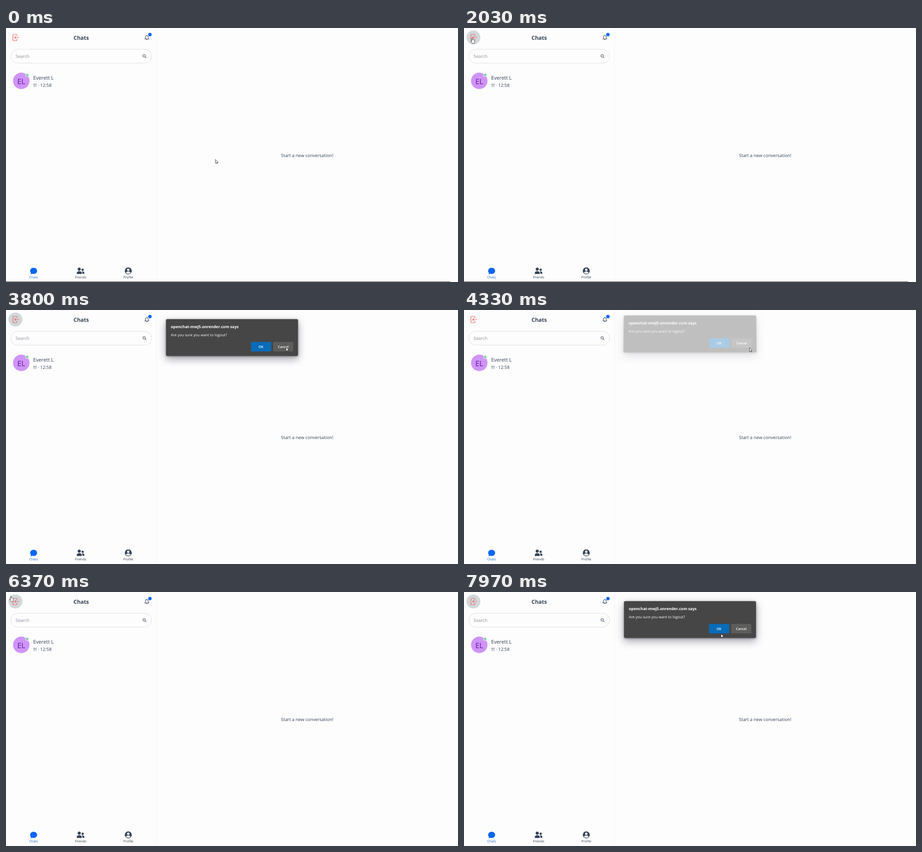
An HTML page for the animation above (8000 ms loop, 998x561 px).

```html
<!DOCTYPE html>
<html lang="en">
<head>
<meta charset="utf-8">
<title>Chats</title>
<style>
  html, body { margin: 0; width: 100%; height: 100%; overflow: hidden; background: #fdfdfd; }
  svg { position: absolute; left: 0; top: 0; font-family: "Open Sans", "Noto Sans", sans-serif; font-size: 9.8px; text-rendering: geometricPrecision; }
  .mid { text-anchor: middle; }
  .nav { font-size: 7.3px; text-anchor: middle; }
  .line { fill: none; stroke-linecap: round; stroke-linejoin: round; }
  #dialog { left: 353px; top: 19.5px; border-radius: 4px; background: #464646; box-shadow: 0 7px 18px rgba(20, 20, 50, .36), 0 1px 5px rgba(0, 0, 0, .3); fill: #fff; }
  #dialog .button { font-size: 7.4px; font-weight: 600; text-anchor: middle; }
</style>
</head>
<body>
<svg width="998" height="561" fill="#334155">
  <rect x="332" width="1" height="561" fill="#f1f1fa"/>

  <circle id="exitHover" cx="20.8" cy="20.8" r="15.4" fill="#d2d8da"/>
  <g class="line" stroke="#ea6262" stroke-width="1.2">
    <path d="M24.3 17.5V16a2 2 0 0 0-2-2h-5a2 2 0 0 0-2 2v10a2 2 0 0 0 2 2h5a2 2 0 0 0 2-2v-1.5M28.5 21H19M21.6 18.3 18.9 21l2.7 2.7"/>
  </g>
  <text class="mid" x="166" y="26" font-size="12" font-weight="700">Chats</text>
  <path class="line" stroke="#334155" stroke-width="1.1" d="M306.7 24.3c1.2-1.1 1.2-2.4 1.3-4.2a3 3.4 0 0 1 6 0c.1 1.8.1 3.1 1.3 4.2zM309.8 24.6a1.3 1.5 0 0 0 2.4 0M311 15.8v.8"/>
  <circle cx="317.8" cy="14.6" r="3.8" fill="#0866f5"/>

  <rect x="10.5" y="47" width="311" height="30.5" rx="15.25" fill="none" stroke="#dedfe2"/>
  <text x="21" y="66.4" fill="#8b929c">Search</text>
  <g class="line" stroke="#596273" stroke-width="1.1">
    <circle cx="305" cy="61.6" r="2.7"/><path d="M307.1 63.7l2.3 2.3"/>
  </g>

  <rect id="itemHover" x="5" y="89" width="322" height="56" rx="5" fill="#f0f0f1"/>
  <circle cx="33.7" cy="116.8" r="18.2" fill="#d094f8"/>
  <text class="mid" x="33.7" y="123.6" font-size="16.2" fill="#5c16a0">EL</text>
  <circle cx="46.6" cy="103.9" r="3.6" fill="#83cfb0" stroke="#fdfdfd"/>
  <text x="60" y="113.6" font-size="11.2" font-weight="500">Everett L</text>
  <text x="60" y="130.4">!!! · 12:58</text>

  <text class="mid" x="665" y="284.7">Start a new conversation!</text>

  <path fill="#0866f5" d="M61 529.6c4.3 0 7.7 3 7.7 6.8s-3.4 6.8-7.7 6.8c-1.2 0-2.3-.2-3.3-.7-1 .8-2.3 1.2-3.9 1.2.8-.9 1.2-1.9 1.3-2.8a6.500 6.500 0 0 1-1.8-4.500c0-3.800 3.400-6.800 7.700-6.800z"/>
  <text class="nav" x="60.8" y="553.4" fill="#1a67c0">Chats</text>
  <circle cx="161.700" cy="532.600" r="3.400"/>
  <path d="M156.300 543.300v-1.800c0-2.600 2-4.200 4.300-4.200h2.400c2.300 0 4.300 1.600 4.300 4.200v1.800z"/>
  <circle cx="169.200" cy="534" r="2.500"/>
  <path d="M168.700 542.800v-1.500c0-1.300-.4-2.500-1.200-3.500h2.200c1.900 0 3.300 1.400 3.300 3.300v1.700z"/>
  <text class="nav" x="164.700" y="553.4">Friends</text>
  <circle cx="270" cy="536.400" r="7.700"/>
  <g fill="#fdfdfd"><circle cx="270" cy="534" r="2.700"/><path d="M264.800 540.300c1-1.700 3-2.500 5.200-2.500s4.200.8 5.200 2.500c-1.200 1.700-3 2.500-5.200 2.500s-4-.8-5.200-2.500z"/></g>
  <text class="nav" x="270" y="553.4">Profile</text>

  <path id="bottomEdge" stroke="#3c3c3c" d="M0 560.5H981"/>
  <g id="status">
    <path fill="#2b2b2d" d="M0 547h258a4 4 0 0 1 4 4v10H0z"/>
    <text x="3" y="556.7" font-size="7.38" fill="#dedede">https://openchat-mwj5.onrender.com/chats/677bab8b2c628144b2123042</text>
  </g>
</svg>

<svg id="dialog" width="292" height="81.500">
  <rect x=".5" y=".5" width="291" height="80.500" rx="3.500" fill="none" stroke="#626262"/>
  <text x="11" y="19.700" font-size="8.550" font-weight="700">openchat-mwj5.onrender.com says</text>
  <text x="11" y="38.200" font-size="8.120">Are you sure you want to logout?</text>
  <rect x="188" y="50.500" width="44.500" height="21" rx="2" fill="#086cb8"/>
  <rect x="237" y="50.500" width="44.500" height="21" rx="2" fill="#5d5d5b"/>
  <text class="button" x="210" y="63.500">OK</text>
  <text class="button" x="259.300" y="63.500">Cancel</text>
</svg>

<svg width="998" height="561">
  <g id="cursor" fill="#fff" stroke="#29292d" stroke-width=".8" stroke-linejoin="round">
    <path id="arrow" d="M.4.4v8.500l2-1.800 1.300 2.800 1.300-.6-1.300-2.700h2.700z"/>
    <path id="hand" d="M-1.100 7V.9c0-1.200 1.800-1.200 1.800 0v3.200c.5-.6 1.500-.5 1.700.2.500-.5 1.400-.3 1.600.4.700-.3 1.500.1 1.500 1v2.500c0 1.400-.8 2-.9 3.800H-.2c-.2-1.400-1.600-2.300-2.600-4-.7-1.300.7-1.700 1.700-.3z"/>
  </g>
</svg>

<script>
const LOOP = 8000;
const el = id => document.getElementById(id);
const clamp = v => Math.min(1, Math.max(0, v));
const ramp = (t, start, length) => clamp((t - start) / length);
const easeOut = p => 1 - (1 - p) ** 2;
const smooth = p => p * p * (3 - 2 * p);
const between = (t, from, to) => t >= from && t < to;
const fade = (t, from, to, length = 150) => ramp(t, from, length) - ramp(t, to, length);

// Pointer tip: time, x, y
const path = [
  [0, 462, 290], [120, 462, 290], [720, 140, 128], [1100, 68, 87],
  [1550, 18, 22], [2480, 18, 22], [2770, 184, 42], [3250, 545, 84],
  [3800, 618, 82], [4150, 630, 83], [4400, 630, 83], [5100, 400, 70],
  [5900, 24, 22], [6370, 11, 9], [7250, 11, 9], [7970, 567, 92], [8000, 567, 92]
];

function pointerAt(t) {
  const i = path.findIndex(key => key[0] > t);
  const [t0, x0, y0] = path[i - 1], [t1, x1, y1] = path[i];
  const p = smooth((t - t0) / (t1 - t0));
  return [x0 + (x1 - x0) * p, y0 + (y1 - y0) * p];
}

function drawDialog(t) {
  const opening = t < 4230 ? ramp(t, 2320, 180) : ramp(t, 6700, 180);
  const closing = between(t, 4230, 6700) ? ramp(t, 4230, 155) : 0;
  const shown = between(t, 4230, 6700) ? 1 - closing : easeOut(opening);
  const away = 1 - shown;
  el("dialog").style.opacity = shown;
  el("dialog").style.transform =
    `translateY(${-12.5 * away}px) perspective(1000px) rotateX(${7 * away}deg) scale(${1 + .008 * away})`;
}

function draw(t) {
  const [x, y] = pointerAt(t);
  const onItem = between(t, 0, 1120) && x < 327 && y > 89 && y < 145;
  const onExit = Math.hypot(x - 20.8, y - 20.8) < 15.5;
  const hand = onItem || onExit || (between(t, 2320, 3200) || t > 6700) && x < 332;

  el("cursor").setAttribute("transform", `translate(${x} ${y})`);
  el("arrow").style.display = hand ? "none" : "";
  el("hand").style.display = hand ? "" : "none";
  el("itemHover").style.opacity = fade(t, 550, 1120, 100);
  el("exitHover").style.opacity = fade(t, 1400, 4220, 120) + fade(t, 5860, LOOP);
  el("status").style.display = between(t, 880, 1380) ? "" : "none";
  el("bottomEdge").style.display = t < 2350 ? "" : "none";
  drawDialog(t);
}

function tick() {
  draw(performance.now() % LOOP);
  requestAnimationFrame(tick);
}
tick();
</script>
</body>
</html>
```
